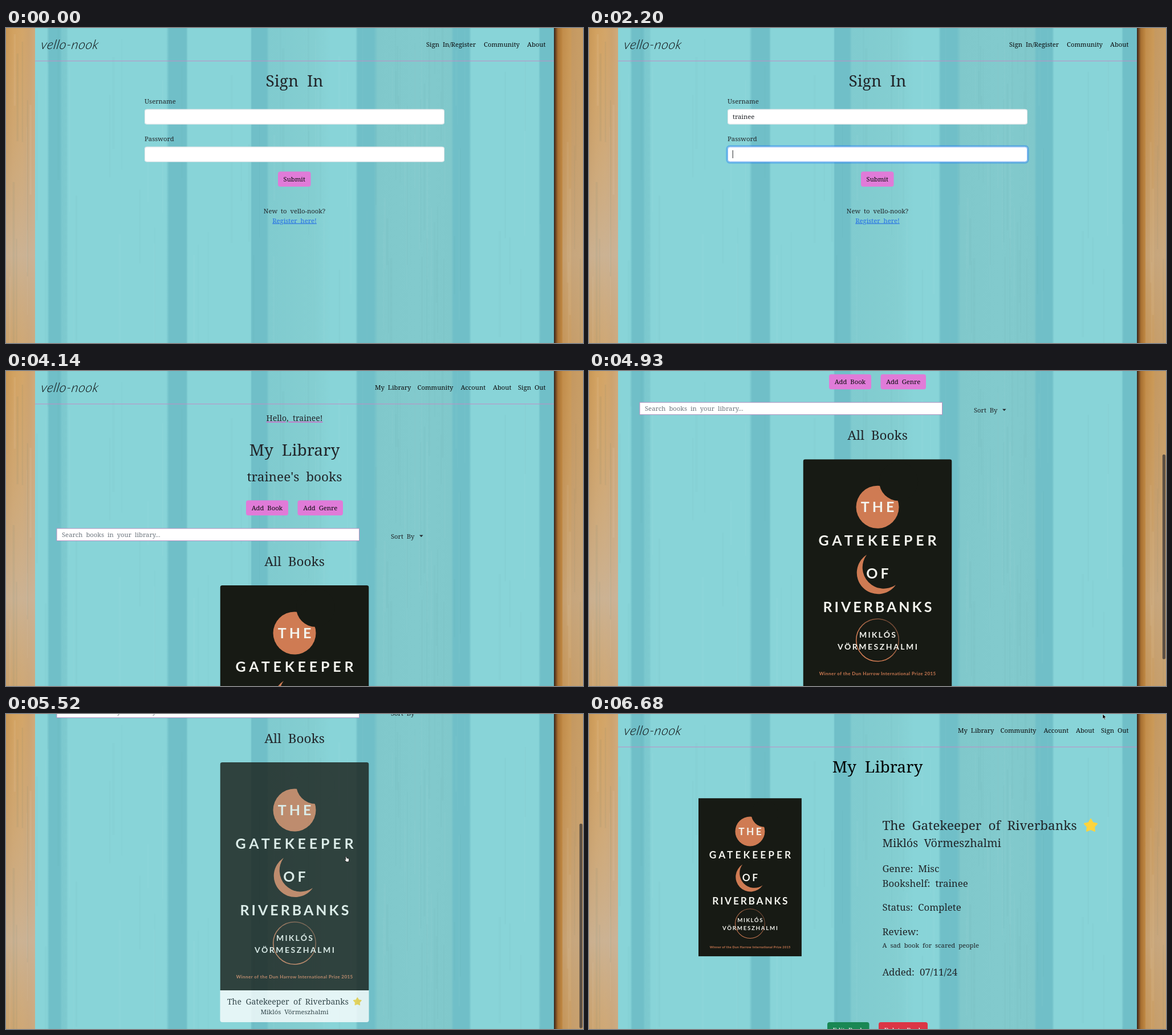
Write an HTML page that moves like this. It is 1012 px wide and 554 px high and loops after 7270 ms.

```html
<!DOCTYPE html>
<html lang="en">
<head>
<meta charset="utf-8">
<title>Book library</title>
<style>
  html, body { margin: 0; width: 100%; height: 100%; overflow: hidden; background: #87d4d8; }
  svg { display: block; width: 100%; height: 100%; }
  text { font-family: "Noto Serif", serif; word-spacing: .27em; white-space: pre; }
  .caps { font-family: Lato, sans-serif; font-weight: 700; word-spacing: 0; }
  .logo { font-family: Lato, sans-serif; font-style: italic; font-weight: 300; word-spacing: 0; letter-spacing: .5px; }
</style>
</head>
<body>
<svg id="stage" viewBox="0 0 1012 554" preserveAspectRatio="none"></svg>
<script>
const LOOP = 7270, REM = 11.25, INK = '#212529', PINK = '#e07bd8';
const SITE = 'vello-nook', USER = 'trainee';
const TITLE = 'The Gatekeeper of Riverbanks', AUTHOR = 'Miklós Vörmeszhalmi';
const PAGE_SCROLL = 292;

const TICKS = [0, 80, 170, 270, 360, 460, 550, 840, 1040, 1130, 1220, 1420, 1610, 1710,
  1910, 2000, 2200, 2390, 2580, 2780, 3070, 3170, 3270, 3460, 3550, 3860, 4140,
  4740, 4840, 4930, 5020, 5110, 5210, 5310, 5410, 5520, 5700, 6100, 6500, 6590, 6680];
const NAME_KEYS = [1040, 1130, 1220, 1420, 1420, 1610, 1710];
const PASS_KEYS = [2390, 2390, 2580, 2780, 2780, 3070, 3170, 3170, 3270];

const clamp = v => Math.max(0, Math.min(1, v));
const ramp = (t, from, len) => clamp((t - from) / len);
const lerp = (a, b, k) => a + (b - a) * k;
const range = (n, f) => Array.from({ length: n }, (_, i) => f(i)).join('');

function random(seed) {
  return () => (seed = (seed * 16807) % 2147483647) / 2147483647;
}

const label = (x, y, str, rem = 1, extra = '') =>
  `<text x="${x}" y="${y}" font-size="${rem * REM}" ${extra}>${str}</text>`;
const centered = (x, y, str, rem = 1, extra = '') =>
  label(x, y, str, rem, 'text-anchor="middle" ' + extra);
const box = (x, y, w, h, fill, extra = '') =>
  `<rect x="${x}" y="${y}" width="${w}" height="${h}" fill="${fill}" ${extra}/>`;
const button = (x, y, w, str, fill = PINK, color = '#0b0b0d') =>
  box(x, y, w, 26.6, fill, 'rx="4"') + centered(x + w / 2, y + 17.5, str, 1, `fill="${color}"`);

function gradient(id, stops, span, vertical) {
  const [a, b] = span;
  const axis = vertical ? `x1="0" x2="0" y1="${a}" y2="${b}"` : `x1="${a}" x2="${b}" y1="0" y2="0"`;
  return `<linearGradient id="${id}" gradientUnits="userSpaceOnUse" ${axis}>` +
    stops.map(([p, c]) => `<stop offset="${(p - a) / (b - a)}" stop-color="${c}"/>`).join('') +
    '</linearGradient>';
}

function wall() {
  const base = '#88d4d8', dark = '#70bfc8', grey = '#80c8cb', mid = '#84ced1';
  const planks = [[51, base], [72, base], [76, dark], [95, dark], [98, '#7bc8ce'], [106, '#7ecacf'],
    [109, base], [281, base], [286, dark], [316, dark], [319, base], [429, base], [431, dark],
    [457, dark], [461, '#80cbcf'], [540, mid], [570, base], [613, base], [617, dark], [645, dark],
    [652, grey], [720, '#82cacd'], [781, grey], [785, dark], [812, dark], [816, base],
    [934, base], [937, dark], [961, dark]];
  const left = [[0, '#c9954f'], [12, '#d3a05a'], [28, '#d5a564'], [40, '#cea26a'], [51, '#d0aa7a']];
  const right = [[961, '#33251d'], [964, '#6b4220'], [968, '#a87031'], [976, '#c18a45'],
    [990, '#cb9853'], [993, '#c4975e'], [1012, '#c99d62']];
  const fade = [[0, '#c9a98720'], [200, '#c9b09470'], [400, '#c9b6a0c8'], [554, '#c9ab8788']];
  const rnd = random(71);
  const grain = (n, x, w, alpha) => range(n, () => {
    const gx = x + rnd() * w, gy = rnd() * 500 - 60, h = 60 + rnd() * 260;
    const tone = rnd() < .5 ? '#ffffff' : '#27606a';
    return box(gx.toFixed(1), gy.toFixed(1), (1 + rnd() * 3).toFixed(1), h.toFixed(1), tone, `opacity="${alpha}"`);
  });
  return '<defs>' + gradient('planks', planks, [51, 961]) + gradient('left', left, [0, 51]) +
    gradient('right', right, [961, 1012]) + gradient('fade', fade, [0, 554], true) +
    '<linearGradient id="ring" x1="1" y1="0" x2="0" y2="1"><stop offset=".1" stop-color="#6b4633"/>' +
    '<stop offset=".7" stop-color="#cf7b53"/></linearGradient></defs>' +
    box(0, 0, 51, 554, 'url(#left)') + box(0, 0, 51, 554, 'url(#fade)') +
    box(51, 0, 910, 554, 'url(#planks)') +
    box(961, 0, 51, 554, 'url(#right)') + box(976, 0, 36, 554, 'url(#fade)', 'opacity=".6"') +
    grain(70, 52, 905, .022) + grain(30, 652, 128, .022) + grain(10, 1, 46, .06) + grain(6, 972, 38, .05);
}

function header(links) {
  return `<text class="logo" transform="translate(60 37) skewX(-10)" font-size="23" fill="#0b0b0d">${SITE}</text>` +
    links.map(([x, str]) => label(x, 33, str, 1, 'fill="#0b0b0d"')).join('') +
    box(51, 57.5, 910, 1, '#c48bc6');
}

function field(id, y) {
  const frame = (color, extra) =>
    `<rect x="243.4" y="${y + .4}" width="525.2" height="26" rx="4" fill="none" stroke="${color}" ${extra}/>`;
  const halo = (color, alpha) =>
    `<rect x="241.6" y="${y - 1.4}" width="528.8" height="29.6" rx="5.4" fill="none" stroke="${color}" stroke-width="2.8" opacity="${alpha}"/>`;
  return box(243, y, 526, 26.8, '#fff', 'rx="4"') + frame('#ced4da', 'stroke-width=".7"') +
    `<g id="${id}Focus">${halo('#0d6efd', .32)}${frame('#86b7fe', '')}</g>` +
    `<g id="${id}Valid">${id === 'pass' ? halo('#198754', .34) : ''}${frame('#198754', '')}` +
    `<path d="M751 ${y + 13.6}l3.3 3.6l6.2-7.8" fill="none" stroke="#198754" stroke-width="2.2"/></g>`;
}

function signInPage() {
  return header([[737, 'Sign In/Register'], [838, 'Community'], [914, 'About']]) +
    centered(506, 103, 'Sign In', 2.5) +
    label(243, 133, 'Username') + field('name', 142.7) + label(252, 160, '', 1, 'id="nameText"') +
    label(243, 199, 'Password') + field('pass', 208.8) +
    `<g id="dots">${range(9, i => `<circle cx="${257.5 + REM * i}" cy="222" r=".8"/>`)}</g>` +
    box(0, 0, 1, 14, INK, 'id="caret"') +
    button(477, 252.5, 57.5, 'Submit') +
    centered(506, 325.5, `New to ${SITE}?`) +
    centered(506, 342.5, 'Register here!', 1, 'fill="#256fe6" text-decoration="underline"');
}

function cover() {
  const caps = (y, str, size, gap, fill = '#f4f4ee') =>
    `<text class="caps" x="${130.5 + gap / 2}" y="${y}" font-size="${size}" letter-spacing="${gap}" text-anchor="middle" fill="${fill}">${str}</text>`;
  const [first, last] = AUTHOR.toUpperCase().split(' ');
  const [the, noun, of, place] = TITLE.toUpperCase().split(' ');
  const rust = '#cf7b53', night = '#171a14';
  return box(0, 0, 261, 401, night) +
    `<circle cx="130.5" cy="84" r="37.5" fill="${rust}"/><circle cx="167.5" cy="39" r="34" fill="${night}"/>` +
    `<path d="M111.5 168A37.5 37.5 0 1 0 162.5 221A37.3 37.3 0 0 1 111.5 168" fill="${rust}"/>` +
    '<circle cx="130.5" cy="318" r="37.3" fill="none" stroke="url(#ring)" stroke-width="1.5"/>' +
    caps(93, the, 25, 5) + caps(152, noun, 25, 5.8) + caps(210, of, 25, 5) + caps(269, place, 25, 4) +
    caps(314, first, 14, 2.2) + caps(334.5, last, 14, 2.5) +
    caps(380, 'Winner of the Dun Harrow International Prize 2015', 8, .45, rust);
}

function star(cx, cy, r) {
  const points = Array.from({ length: 10 }, (_, i) => {
    const d = i % 2 ? r * .54 : r, a = i * Math.PI / 5;
    return [cx + d * Math.sin(a), cy - d * Math.cos(a)].map(v => v.toFixed(1));
  });
  return `<polygon points="${points.join(' ')}" fill="#fdd43f" stroke="#fdd43f" stroke-width="${r * .2}" stroke-linejoin="round"/>`;
}

const memberHeader = () => header([[647, 'My Library'], [721.5, 'Community'], [797.5, 'Account'], [854, 'About'], [898, 'Sign Out']]);

function libraryPage() {
  return memberHeader() +
    centered(506, 88, `<tspan fill="${INK}">Hello, ${USER}!</tspan>`, 1.25, 'fill="#d65fc6" text-decoration="underline"') +
    centered(506, 149, 'My Library', 2.5) +
    centered(506, 194, `${USER}'s books`, 2) +
    button(421, 227.5, 74, 'Add Book') + button(511.5, 227.5, 79.5, 'Add Genre') +
    box(89, 277, 530.5, 21.5, '#fff', 'stroke="#b78fc0" stroke-width="1"') +
    label(98, 292, 'Search books in your library...', 1, 'fill="#6c757d"') +
    label(675, 294.5, 'Sort By') + '<path d="M725 288.5h6.6l-3.3 3.4z"/>' +
    centered(506, 343, 'All Books', 2) +
    `<g id="card"><clipPath id="round">${box(375.5, 377, 261, 457, '#000', 'rx="4"')}</clipPath>` +
    `<g id="cardCover" clip-path="url(#round)"><g transform="translate(375.5 377)">${cover()}</g></g>` +
    '<g id="cardFoot">' +
    '<path d="M375.5 778h261v52a4 4 0 0 1-4 4h-253a4 4 0 0 1-4-4z" fill="#fff"/>' +
    label(388, 803, TITLE, 1.25) + star(616.3, 798, 7) + centered(506, 820, AUTHOR) + '</g></g>';
}

function detailPage() {
  return memberHeader() + centered(506, 103, 'My Library', 2.5, 'fill="#000"') +
    `<g id="detailCover" transform="translate(192 148.2) scale(.693)">${cover()}</g>` +
    label(514.5, 204, TITLE, 2) + star(880, 196.5, 11.5) +
    label(514.5, 234, AUTHOR, 1.75) +
    label(514.5, 277.5, 'Genre: Misc', 1.5) + label(514.5, 303.5, `Bookshelf: ${USER}`, 1.5) +
    label(514.5, 346, 'Status: Complete', 1.5) + label(514.5, 389, 'Review:', 1.5) +
    label(514.5, 411, 'A sad book for scared people') +
    label(514.5, 459.5, 'Added: 07/11/24', 1.5) +
    button(418, 542, 73.5, 'Edit Book', '#198754', '#fff') +
    button(508, 542, 86, 'Delete Book', '#dc3545', '#fff');
}

const pointers =
  '<path id="beam" d="M-1.8-5h1.3l.5.5l.5-.5h1.3M0-4.5v9M-1.8 5h1.3l.5-.5l.5.5h1.3" fill="none" stroke="#111" stroke-width=".9"/>' +
  '<path id="arrow" d="M0 0v8.6l1.9-1.8l1.4 3.2l1.4-.6l-1.4-3.1h2.7z" fill="#000" stroke="#fff" stroke-width=".6"/>' +
  '<path id="hand" d="M-2.2-4.2q.9-.8 1.6.2l.9 2.6l3 .6q1 .3 .9 1.5l-.4 2.9l-.6 1.4h-3.8l-3-3.4q-.2-1 1-.8l1 .6z" fill="#fff" stroke="#111" stroke-width=".8"/>';

const stage = document.getElementById('stage');
stage.innerHTML = wall() + `<g fill="${INK}"><g id="signIn">${signInPage()}</g>` +
  `<g id="library">${libraryPage()}</g><g id="detail">${detailPage()}</g></g>` +
  box(1005.8, 0, 5.2, 360, '#4b423c', 'id="thumb" rx="2.6" opacity=".85"') + pointers;

const el = {};
stage.querySelectorAll('[id]').forEach(node => el[node.id] = node);
const show = (node, on) => node.style.display = on ? '' : 'none';
const fade = (node, k) => node.setAttribute('opacity', k);
const move = (node, x, y) => node.setAttribute('transform', `translate(${x} ${y})`);
const typed = (keys, t) => keys.filter(k => k <= t).length;

function drawSignIn(t) {
  const name = ramp(t, 320, 140), pass = ramp(t, 1850, 150), valid = ramp(t, 3400, 150);
  fade(el.nameFocus, name * (1 - pass));
  fade(el.passFocus, pass * (1 - valid));
  fade(el.nameValid, valid);
  fade(el.passValid, valid);

  el.nameText.textContent = USER.slice(0, typed(NAME_KEYS, t));
  const count = typed(PASS_KEYS, t);
  [...el.dots.children].forEach((dot, i) => show(dot, i < count));

  const onPass = pass > 0;
  const caretX = 252 + (onPass ? count * REM : el.nameText.getComputedTextLength());
  move(el.caret, caretX - .3, onPass ? 215 : 149);
  show(el.caret, name > 0 && (t < 840 || t >= 1040));
}

function drawLibrary(t) {
  const scroll = PAGE_SCROLL * (1 - Math.pow(1 - ramp(t, 4700, 710), 3.64));
  move(el.library, 0, -scroll);
  const loaded = t >= 4140;
  show(el.cardCover, loaded);
  move(el.cardFoot, 0, loaded ? 0 : -401);
  fade(el.card, t >= 5520 ? .78 : 1);
  move(el.thumb, 0, 1.5 + scroll * 554 / (554 + PAGE_SCROLL));
}

function drawPointers(t) {
  const enter = ramp(t, 80, 280), leave = ramp(t, 6500, 180);
  show(el.beam, t >= 80 && t < 2200);
  move(el.beam, lerp(640, 601, enter), lerp(192, 155, enter));
  show(el.hand, t >= 5520 && t < 5700);
  move(el.hand, 597.5, 255);
  show(el.arrow, t >= 6500);
  move(el.arrow, lerp(709, 901, leave), lerp(131, 0, leave));
}

function draw(time) {
  const t = TICKS.filter(tick => tick <= time).pop();
  show(el.signIn, t < 3860);
  show(el.library, t >= 3860 && t < 5700);
  show(el.detail, t >= 5700);
  show(el.detailCover, t >= 6100);
  show(el.thumb, t >= 4740 && t < 5700);
  drawSignIn(t);
  drawLibrary(t);
  drawPointers(t);
}

function loop() {
  draw(performance.now() % LOOP);
  requestAnimationFrame(loop);
}
loop();
</script>
</body>
</html>
```
